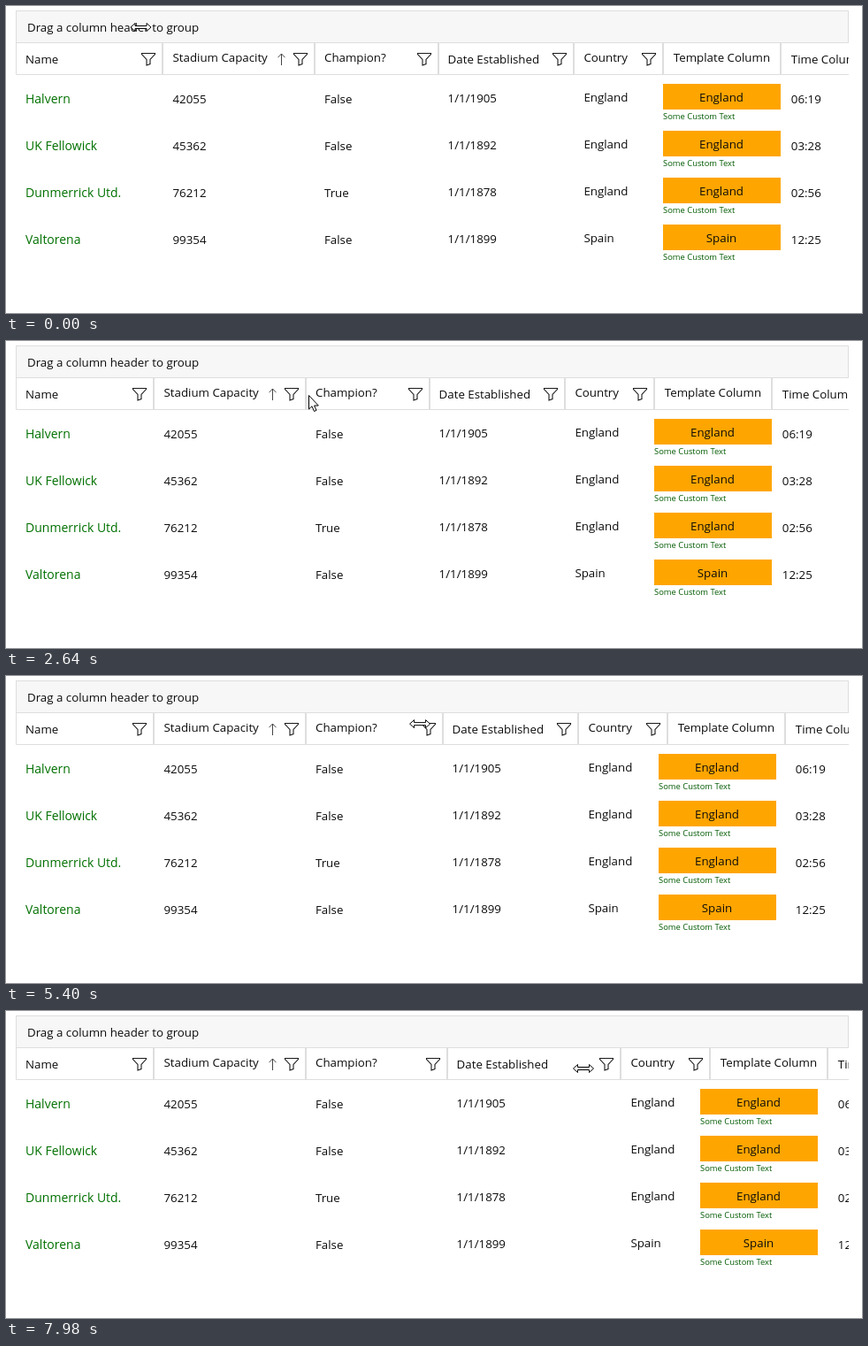
These frames come from a looping animation (968 by 347 pixels, 8 s). An HTML page:

```html
<!DOCTYPE html>
<html lang="en">
<head>
<meta charset="utf-8">
<title>Resizable data grid</title>
<style>
  html, body { margin: 0; width: 100%; height: 100%; overflow: hidden; background: #fff; }
  svg { display: block; width: 968px; height: 347px; }
  text { font: 13.3px "Open Sans", "Noto Sans", sans-serif; fill: #0c0c0c; white-space: pre; }
  .team { font-size: 14px; fill: #007000; }
  .note { font-size: 9.4px; font-weight: 500; fill: #005a00; }
  .mid { text-anchor: middle; }
  .icon { fill: none; stroke: #1a1a1a; stroke-width: 1.1; }
  .sort { fill: none; stroke: #444; stroke-width: 1; }
  .cursor { fill: #fff; stroke: #000; stroke-width: 1; }
</style>
</head>
<body>
<svg viewBox="0 0 968 347">
  <defs><clipPath id="view"><rect width="953" height="347"/></clipPath></defs>
  <rect x="11.5" y="5.5" width="941" height="36" fill="#f7f7f7" stroke="#dedede"/>
  <text x="24" y="29">Drag a column header to group</text>
  <path d="M11.5 41V77.5H953" fill="none" stroke="#dedede"/>
  <g id="grid" clip-path="url(#view)"></g>
  <path id="resize" class="cursor" d="M-11.5 0L-6.5-4.5V-1.5H6.5V-4.5L11.5 0L6.5 4.5V1.5H-6.5V4.5Z"/>
  <path id="arrow" class="cursor" d="M.5.5V16L4 12.8L6.5 18.5L9 17.4L6.6 12H11.3Z"/>
</svg>
<script>
const LOOP = 8000, STEP = 30, LEFT = 11, ROW = 53;
const LAG = 90; // the grid follows the pointer this late
const FUNNEL = 'M-7.5 53.5H7.5V54.5L2 60.5V65.5L-2 67V60.5L-7.5 54.5Z';
const SORT = 'M0 67V54M-4 58.2L0 54L4 58.2';
const countries = ['England', 'England', 'England', 'Spain'];

// drag: when the right edge is grabbed and released
const columns = [
  { title: 'Name', width: 166, drag: [840, 1710], y: 65, dx: 11, cellY: 110, cls: 'team', filter: true,
    cells: ['Halvern', 'UK Fellowick', 'Dunmerrick Utd.', 'Valtorena'] },
  { title: 'Stadium Capacity', width: 172, y: 63, dx: 11.5, cellY: 110, filter: true, sorted: true,
    cells: ['42055', '45362', '76212', '99354'] },
  { title: 'Champion?', width: 140, drag: [4680, 6000], y: 63, dx: 11, cellY: 110, filter: true,
    cells: ['False', 'False', 'True', 'False'] },
  { title: 'Date Established', width: 153, drag: [7050, LOOP], y: 65, dx: 10.6, cellY: 109, filter: true,
    cells: ['1/1/1905', '1/1/1892', '1/1/1878', '1/1/1899'] },
  { title: 'Country', width: 101, y: 63, dx: 11.4, cellY: 108, filter: true, cells: countries },
  { title: 'Template Column', width: 133, y: 63, dx: 11.8, template: true, cells: countries },
  { title: 'Time Column', width: 133, y: 65, dx: 11.8, cellY: 110,
    cells: ['06:19', '03:28', '02:56', '12:25'] }
];

// eased pointer moves: start, duration, destination x, y
const home = { x: 152.5, y: 24 };
const moves = [
  [0, 510, 175, 55],
  [840, 360, 222, 57], [1200, 270, 185, 60], [1470, 240, 165, 60],
  [1860, 780, 342, 61], [3150, 60, 345, 60], [3360, 210, 335, 59], [3900, 330, 477, 58],
  [4680, 90, 460.5, 57], [4860, 200, 525, 55], [5060, 500, 459.5, 54],
  [5560, 200, 501, 57], [5910, 90, 497, 57],
  [6240, 540, 650, 56], [7050, 330, 722, 57], [7620, 720, 584, 73]
];
// spans in which the pointer is a plain arrow
const arrowSpans = [[1980, 4170], [6360, 6690]];

const byId = id => document.getElementById(id);
const clamp = (v, lo, hi) => Math.min(hi, Math.max(lo, v));
const ease = p => p < 0.5 ? 4 * p ** 3 : 1 - 4 * (1 - p) ** 3;
const move = (node, x, y = 0) => node.setAttribute('transform', `translate(${x} ${y})`);

function add(parent, tag, attrs = {}, content = '') {
  const node = document.createElementNS('http://www.w3.org/2000/svg', tag);
  for (const key in attrs) node.setAttribute(key, attrs[key]);
  node.textContent = content;
  return parent.appendChild(node);
}

function pointerAt(t) {
  let { x, y } = home;
  for (const [start, duration, toX, toY] of moves) {
    const p = ease(clamp((t - start) / duration, 0, 1));
    x += (toX - x) * p;
    y += (toY - y) * p;
  }
  return { x, y };
}

function widthAt(col, t) {
  if (!col.drag) return col.width;
  const [grab, release] = col.drag;
  return col.width + pointerAt(clamp(t, grab, release)).x - pointerAt(grab).x;
}

for (const col of columns) {
  const grid = byId('grid');
  col.head = add(grid, 'g');
  add(col.head, 'text', { x: col.dx, y: col.y }, col.title);
  col.body = add(grid, 'g');
  col.cells.forEach((value, row) => {
    const y = row * ROW;
    if (col.template) {
      add(col.body, 'rect', { x: 0, y: 88 + y, width: col.width, height: 29, fill: '#ffa500' });
      add(col.body, 'text', { x: 66, y: 108 + y, class: 'mid' }, value);
      add(col.body, 'text', { x: 0, y: 128 + y, class: 'note' }, 'Some Custom Text');
    } else {
      add(col.body, 'text', { x: col.dx, y: col.cellY + y, class: col.cls || '' }, value);
    }
  });
  // parts that follow the right edge
  col.edge = add(grid, 'g');
  add(col.edge, 'rect', { x: -1, y: 42, width: 2, height: 35, fill: '#dedede' });
  if (col.filter) add(col.edge, 'path', { d: FUNNEL, class: 'icon', transform: 'translate(-16 0)' });
  if (col.sorted) add(col.edge, 'path', { d: SORT, class: 'sort', transform: 'translate(-37.5 0)' });
}

function draw(t) {
  let x = LEFT, ahead = LEFT;
  for (const col of columns) {
    move(col.head, Math.round(x));
    // template cells are laid out one step before the others
    move(col.body, Math.round(col.template ? ahead : x));
    x += widthAt(col, t - LAG);
    ahead += widthAt(col, t - LAG + STEP);
    move(col.edge, Math.round(x));
  }
  const plain = arrowSpans.some(([from, to]) => t >= from && t < to);
  const { x: px, y: py } = pointerAt(t);
  move(byId('arrow'), px, py);
  move(byId('resize'), px, py);
  byId('arrow').style.display = plain ? '' : 'none';
  byId('resize').style.display = plain ? 'none' : '';
}

const start = performance.now();
function tick() {
  const t = (performance.now() - start) % LOOP;
  draw(Math.floor(t / STEP) * STEP);
  requestAnimationFrame(tick);
}
tick();
</script>
</body>
</html>
```
